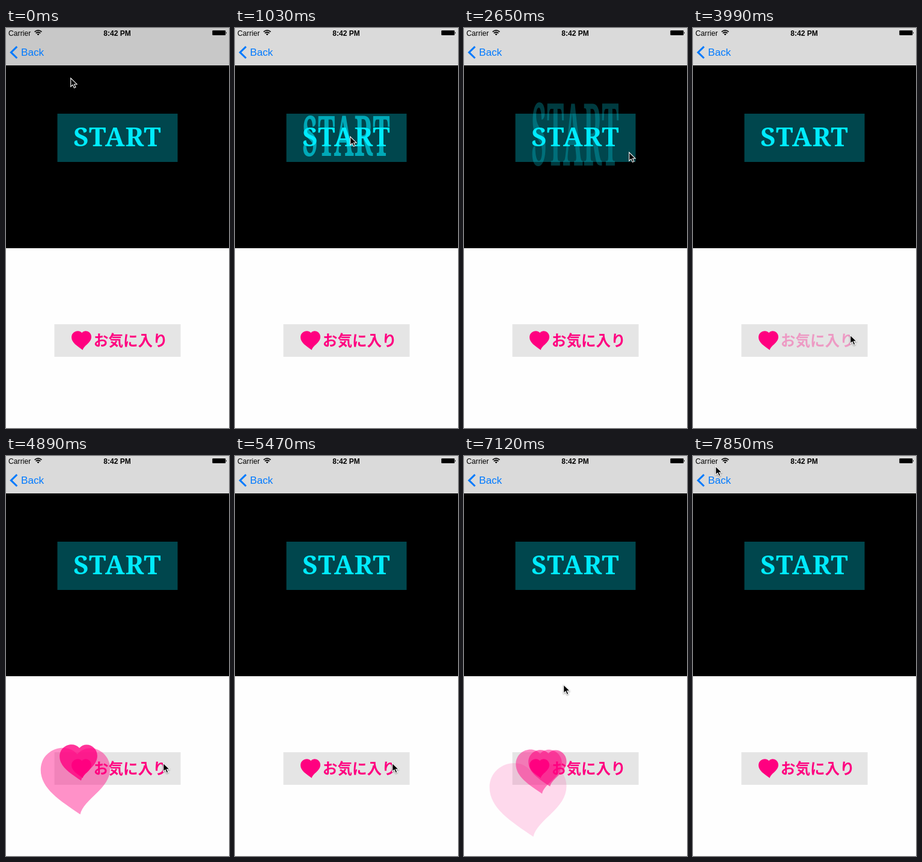
An HTML page that plays this animation: 371 by 663 pixels, repeating every 7.99 s.

```html
<!DOCTYPE html>
<html lang="ja">
<head>
<meta charset="utf-8">
<title>Tap effects</title>
<style>
  html, body { margin: 0; width: 100%; height: 100%; overflow: hidden; background: #fefefe; }
  svg { display: block; width: 371px; height: 663px; }
  .ui { font-family: "Liberation Sans", Arial, sans-serif; }
  .start { font: bold 43.5px "Noto Serif", serif; letter-spacing: 1px; fill: #00ebff; text-anchor: middle; }
  .like { font: bold 24.6px "Noto Sans CJK JP", "Noto Sans CJK", sans-serif; fill: #ff0080; text-anchor: middle; }
  #cursor { filter: drop-shadow(0 1px 1px #0006); }
</style>
</head>
<body>
<svg viewBox="0 0 371 663">
  <defs>
    <path id="heart" fill="#ff0080" d="M3-44C-16-66-58-52-58-18C-58 13-26 33 8 56C14 30 58 14 58-20C58-50 22-66 3-44Z"/>
  </defs>
  <rect width="371" height="663" fill="#fefefe"/>
  <rect id="nav" width="371" height="62"/>
  <rect y="62" width="371" height="303"/>

  <g class="ui">
    <text x="4" y="13" font-size="12.2">Carrier</text>
    <text x="185" y="13" font-size="12" font-weight="bold" text-anchor="middle">8:42 PM</text>
    <text x="25" y="46" font-size="17.2" fill="#007aff">Back</text>
  </g>
  <g fill="none" stroke="#000" stroke-width="1.7">
    <path d="M47.6 6.4Q53.5 1.4 59.4 6.4M49.7 8.6Q53.5 5.4 57.3 8.6"/>
    <path d="M53.5 12.3L51.4 10.1Q53.5 8.3 55.6 10.1Z" fill="#000" stroke="none"/>
  </g>
  <rect x="343.3" y="4" width="22" height="8" rx="1"/>
  <path d="M366 6.4Q368 8 366 9.6Z"/>
  <path d="M18.3 30.8L8.4 40.4L18.3 50" fill="none" stroke="#007aff" stroke-width="3"/>

  <rect x="85.5" y="142" width="200" height="80" fill="#00464d"/>
  <text id="start" class="start" x="185.5" y="196">START</text>
  <text id="ghost" class="start" x="185.5" y="196">START</text>

  <rect x="80.5" y="491" width="210" height="54" fill="#e5e5e5"/>
  <text id="like" class="like" x="207.3" y="526.5">お気に入り</text>
  <use href="#heart" transform="translate(125.5 517.7) scale(.2845)"/>
  <g id="burst"></g>

  <path id="cursor" d="M.7 1V15.2L4 12.2L6.4 17.4L8.9 16.3L6.6 11.2H11Z" stroke="#fff" stroke-width="1.1"/>
</svg>
<script>
const LOOP = 7990, FRAMES = 54;
const HEART = { x: 125.5, y: 517.7, width: 33, unit: 116 };
const DRIFT = { x: -1.3, y: 1.1 };
const $ = id => document.getElementById(id);
const set = (node, name, value) => node.setAttribute(name, value);

// All times below are counted in frames
const startTaps = [6, 15];
const likeTaps = [
  { at: 27, end: 37, life: 8.8, peak: 1, grow: 16.5,
    hearts: [{ delay: 1, vx: 4.5, vy: -1.4 }, { delay: 4.2, vx: -.4, vy: -7.5 }] },
  { at: 43, end: 51, life: 6.2, peak: .75, grow: 19,
    hearts: [{ delay: 0, vx: 2.7, vy: 4.8 }, { delay: 2.7, vx: 2.6, vy: -.4 }, { delay: 3.4, vx: 10.4, vy: -2.1 }] }
];

const cursorStops = [
  { at: 0, x: 107, y: 82 }, { at: 2, x: 191, y: 179 },
  { at: 9, x: 191, y: 179 }, { at: 11, x: 334, y: 196 }, { at: 13, x: 274, y: 205 },
  { at: 20, x: 274, y: 205 }, { at: 21, x: 288, y: 270 }, { at: 23, x: 261, y: 508 },
  { at: 45, x: 261, y: 508 }, { at: 48, x: 165, y: 378 },
  { at: 50, x: 118, y: 289 }, { at: 53, x: 37, y: 16 }
];

function cursorAt(frame) {
  const next = cursorStops.findIndex(stop => stop.at >= frame);
  const to = cursorStops[next], from = cursorStops[next - 1] || to;
  const k = (frame - from.at) / (to.at - from.at || 1);
  return { x: from.x + (to.x - from.x) * k, y: from.y + (to.y - from.y) * k };
}

function drawHearts(frame) {
  $("burst").replaceChildren();
  const tap = likeTaps.find(({ at, end }) => frame >= at && frame < end);
  if (!tap) return;
  for (const { delay, vx, vy } of tap.hearts) {
    const age = frame - tap.at - delay;
    if (age <= 0 || age >= tap.life) continue;
    const x = HEART.x + vx * age + DRIFT.x * age * age;
    const y = HEART.y + vy * age + DRIFT.y * age * age;
    const scale = (HEART.width + tap.grow * age) / HEART.unit;
    const heart = document.createElementNS("http://www.w3.org/2000/svg", "use");
    set(heart, "href", "#heart");
    set(heart, "opacity", tap.peak * (1 - age / tap.life));
    set(heart, "transform", `translate(${x} ${y}) scale(${scale})`);
    $("burst").append(heart);
  }
}

function drawGhost(frame) {
  const tap = startTaps.find(at => frame > at && frame < at + 3);
  const age = tap ? frame - tap : 0;
  const stretch = 1 + 1.15 * age;
  set($("ghost"), "opacity", age ? .95 - .35 * age : 0);
  set($("ghost"), "transform", `translate(0 ${182 * (1 - stretch)}) scale(1 ${stretch})`);
}

function draw(time) {
  // A small lead absorbs rounding at the frame boundaries
  const frame = Math.min(FRAMES - 1, Math.floor(time / LOOP * FRAMES + .08));
  const { x, y } = cursorAt(frame);
  const gray = 200 + 9 * Math.min(frame, 2);
  set($("cursor"), "transform", `translate(${x} ${y})`);
  set($("nav"), "fill", `rgb(${gray},${gray},${gray})`);
  set($("start"), "opacity", startTaps.includes(frame) ? .35 : 1);
  set($("like"), "opacity", likeTaps.some(tap => tap.at === frame) ? .32 : 1);
  drawGhost(frame);
  drawHearts(frame);
}

function loop() {
  draw(performance.now() % LOOP);
  requestAnimationFrame(loop);
}
loop();
</script>
</body>
</html>
```
